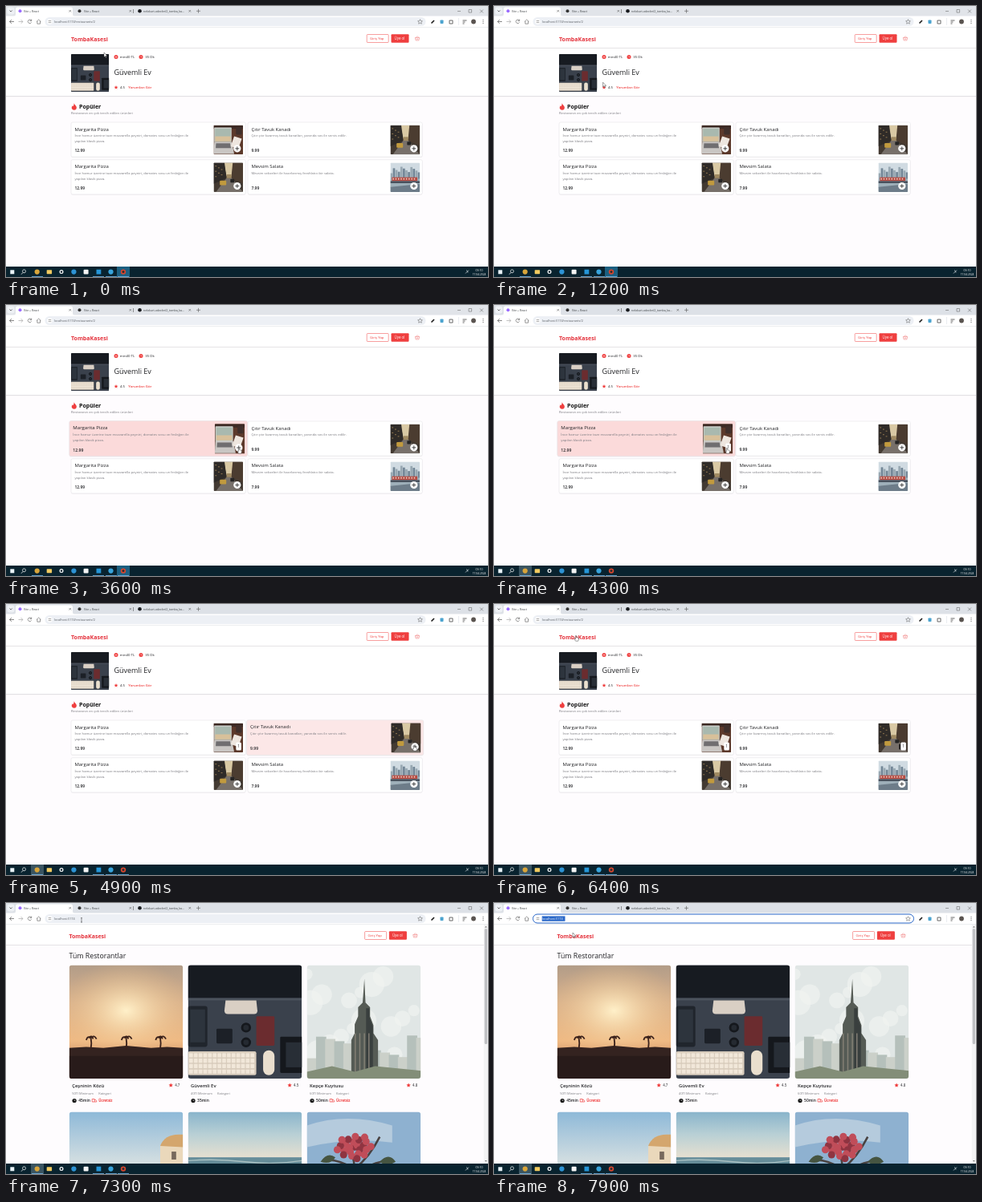
An HTML page that plays this animation: 600 by 338 pixels, repeating every 8000 ms.

```html
<!DOCTYPE html>
<html lang="tr">
<head>
<meta charset="utf-8">
<title>Restaurant menu</title>
<style>
html, body { margin: 0; width: 100%; height: 100%; overflow: hidden; background: #fff; }
svg { display: block; width: 100vw; height: 100vh; font-family: "Open Sans", "Noto Sans", sans-serif; }
text { white-space: pre; }
</style>
</head>
<body>
<svg id="stage" viewBox="0 0 600 338" xmlns="http://www.w3.org/2000/svg"></svg>
<script>
const LOOP = 8000;
const RED = '#ef3f3f', INK = '#202124', GRAY = '#7b7b80';
const BRAND = 'TombaKasesi', PLACE = 'Güvemli Ev';

const text = (x, y, size, str, fill = INK, weight = 400, extra = '') =>
  `<text x="${x}" y="${y}" font-size="${size}" fill="${fill}" font-weight="${weight}" ${extra}>${str}</text>`;
const rect = (x, y, w, h, fill, rx = 0, extra = '') =>
  `<rect x="${x}" y="${y}" width="${w}" height="${h}" rx="${rx}" fill="${fill}" ${extra}/>`;
const dot = (x, y, r, fill, extra = '') => `<circle cx="${x}" cy="${y}" r="${r}" fill="${fill}" ${extra}/>`;
const path = (d, fill = 'none', stroke = 'none', width = 0.6, extra = '') =>
  `<path d="${d}" fill="${fill}" stroke="${stroke}" stroke-width="${width}" ${extra}/>`;
const group = (id, body, extra = '') => `<g id="${id}" ${extra}>${body}</g>`;
const repeat = (n, fn) => Array.from({ length: n }, (_, i) => fn(i)).join('');
const photo = (id, x, y, s) => `<use href="#${id}" x="${x}" y="${y}" width="${s}" height="${s}"/>`;
const star = (x, y, r) => {
  const pts = repeat(10, i => {
    const a = i * Math.PI / 5 - Math.PI / 2, k = i % 2 ? r * 0.48 : r;
    return `${(x + k * Math.cos(a)).toFixed(2)},${(y + k * Math.sin(a)).toFixed(2)} `;
  });
  return `<polygon points="${pts}" fill="${RED}"/>`;
};
const gradient = (id, ...colors) => `<linearGradient id="${id}" x2="0" y2="1">` +
  colors.map((c, i) => `<stop offset="${i / (colors.length - 1)}" stop-color="${c}"/>`).join('') + '</linearGradient>';
const symbol = (id, body) =>
  `<symbol id="${id}" viewBox="0 0 100 100"><g clip-path="url(#round)">${body}</g></symbol>`;

// Photos, each on a 100 x 100 square
const palm = x => path(`M${x} 74q1-5 0-10m-4 2q1-4 4-2q3-3 5 1m-7-1q3-3 4 1`, 'none', '#3a211b', 1.3);
const photos =
  symbol('desk', rect(0, 0, 100, 100, '#3a414c') + rect(0, 0, 100, 29, '#171b21') + rect(0, 29, 100, 2, '#4c535d') +
    path('M33 31h27l1 9q0 3-3 3H35q-3 0-3-3z', '#d9cfc4') + rect(0, 36, 17, 36, '#20252c', 2) +
    rect(2, 39, 13, 29, '#2d343d') + rect(25, 56, 14, 13, '#1c2027', 1) +
    dot(51, 55, 3.4, '#252a31', 'stroke="#15181d" stroke-width="2"') + dot(51, 68, 3.4, '#252a31', 'stroke="#15181d" stroke-width="2"') +
    rect(60, 45, 16, 26, '#6b2c2f', 1) + rect(81, 63, 20, 32, '#15181d', 1) + rect(86, 68, 15, 22, '#282e36') +
    rect(0, 76, 60, 21, '#d9cdbd', 1.5) +
    repeat(4, r => repeat(14, c => rect(1 + c * 4.15, 77.5 + r * 4.8, 3.3, 3.7, '#f1e7d9', 0.5))) +
    rect(66, 75, 10, 22, '#eadfce', 5)) +
  symbol('laptop', rect(0, 0, 100, 100, '#5c392b') + rect(0, 0, 100, 12, '#3d2a24') + rect(2, 8, 59, 50, '#c8cdc8', 2) +
    rect(5, 12, 53, 43, '#a9b9af') + rect(5, 38, 53, 17, '#d8c09a') + path('M2 58h60l8 40H0z', '#c9c6c3') +
    path('M8 62h48l3 16H7z', '#706e70') + path('M70 38l26 8-12 34-26-8z', '#eee6df') + rect(76, 8, 20, 24, '#40302c', 3)) +
  symbol('street', rect(0, 0, 100, 100, '#433a32') + path('M34 0h34l-6 46H44z', '#d9c9a4') + path('M0 0h37l7 53L0 72z', '#2f2b28') +
    path('M65 0h35v70L60 52z', '#4b3c30') + path('M44 52h17l39 48H8z', '#77706a') + rect(44, 40, 17, 13, '#a08a62') +
    rect(21, 61, 22, 16, '#c19a3e', 3) + rect(57, 56, 13, 12, '#252424', 2) + rect(70, 71, 23, 19, '#23201f', 3) +
    repeat(7, i => rect(5 + i % 3 * 10, 10 + i * 6, 5, 3, '#8d744e'))) +
  symbol('skyline', rect(0, 0, 100, 100, '#d0dbe2') +
    repeat(12, i => rect(i * 8.5, 36 - (i * 17 % 23), 7.5, 50, i % 2 ? '#738797' : '#98a8b2')) +
    rect(0, 55, 100, 45, '#9eafb9') + rect(5, 50, 87, 13, '#b74b42') + repeat(9, i => rect(8 + i * 9, 53, 4, 5, '#e8d3c8')) +
    rect(0, 63, 100, 7, '#47505c') + path('M0 83l100-10v27H0z', '#6d7c89')) +
  symbol('sunset', rect(0, 0, 100, 100, 'url(#dusk)') + rect(0, 0, 100, 73, 'url(#sun)') +
    path('M0 73l15-1 15 1 20-2 22 2 14-1 14 1v27H0z', '#342320') + rect(0, 80, 100, 20, '#281b1a') + palm(19) + palm(50) + palm(80)) +
  symbol('tower', rect(0, 0, 100, 100, '#e0e6e5') +
    repeat(16, i => dot(i * 37 % 101, 8 + i * 23 % 76, 5 + i % 4 * 2, '#f2f4f1', 'opacity=".65"')) +
    repeat(13, i => rect(i * 8, 82 - i * 19 % 21, 9, 40, i % 2 ? '#b5c0bb' : '#cbd0c9')) +
    path('M50.5 12l1 21 4 4v8l3 8v7l4 6v34H39V66l3-6v-8l3-7v-8l4-4z', '#555b55') +
    path('M52 38h3v8l3 8v46h-6z', '#393f3e') + repeat(4, i => rect(42 + i * 4, 60, 1, 39, '#858176')) +
    path('M0 94l22-5 20 5 18-5 40 4v7H0z', '#838e78')) +
  symbol('house', rect(0, 0, 100, 100, 'url(#morning)') + path('M80 100V31q0-2 3-2h17v71z', '#ead8bb') +
    path('M80 30q4-10 16-10h4v11z', '#d4a66d') + rect(90, 35, 4, 7, '#77685c')) +
  symbol('sea', rect(0, 0, 100, 40, 'url(#haze)') + rect(0, 40, 100, 60, '#668d99') + path('M0 43q25-2 50 1t50-1', 'none', '#a9c0c2', 1)) +
  symbol('flowers', rect(0, 0, 100, 100, '#8eb1d0') + path('M0 12q35-12 75 0v15q-35-5-75 4z', '#b5cbdd') +
    path('M42 50q-1-15-9-24M42 50q13-10 22-28M42 50q-18-10-27-7M50 50q14-8 24-6', 'none', '#494241', 1.8) +
    repeat(24, i => dot(42 + 16 * Math.sin(i * 2.4) * Math.sqrt(i / 24), 31 + 11 * Math.cos(i * 2.4) * Math.sqrt(i / 24), 3.2, i % 3 ? '#c04d59' : '#8f3441')) +
    path('M12 44q6-9 13-4q-4 7-13 4M64 44q8-9 14 0q-8 5-14 0', '#465541'));

const defs = `<defs><clipPath id="round"><rect width="100" height="100" rx="2.5"/></clipPath>
  ${gradient('dusk', '#b29c88', '#d8b28d', '#efba84', '#b06d50')}
  ${gradient('morning', '#8eb9d8', '#dce3e2', '#ece2d5')}
  ${gradient('haze', '#89b4cb', '#b9d0d5', '#e5dfd0')}
  <radialGradient id="sun" cx=".5" cy=".55" r=".6"><stop stop-color="#fff0c9"/><stop offset="1" stop-color="#efbd83" stop-opacity="0"/></radialGradient>
  ${photos}</defs>`;

// Browser window
const tab = (x, icon, title) => icon + text(x + 7, 7.8, 3.5, title, '#3c4043') +
  path(`M${x + 63.5} 5l2.6 2.6m0-2.6l-2.6 2.6`, 'none', '#444', 0.5);
const browser =
  `<rect id="strip" width="600" height="14"/>` + rect(1.5, 1.5, 9, 9, '#eef1f5', 3) + path('M4.5 5.5l1.6 1.6 1.6-1.6', 'none', '#333', 0.7) +
  path('M9 13q3 0 3-3V4q0-2.5 2.5-2.5h66Q83 1.500 83 4v6q0 3 3 3z', '#fff') + rect(0, 12.5, 600, 14, '#fff') +
  tab(15, dot(17.5, 6.3, 2, '#9b6cff'), 'Vite + React') +
  tab(90, dot(91.500, 6.3, 2, '#333'), 'Vite + React') +
  tab(164, dot(166.5, 6.3, 2.3, '#191b1f'), 'nelokurt-odevler/2_tomba_ka…') +
  path('M158.500 4v5M237 6.300h5m-2.500-2.500v5', 'none', '#555', 0.6) +
  path('M562 6.500h4m10-2h3.600v3.600h-3.600zM590 4.500l4 4m0-4l-4 4', 'none', '#555', 0.5) +
  path('M10 19.500H4.500m2.400-2.400l-2.400 2.400 2.400 2.400', 'none', '#555', 0.7) +
  path('M15.500 19.500H21m-2.400-2.400l2.400 2.400-2.400 2.400', 'none', '#aaa', 0.7) +
  path('M31.500 18a2.300 2.300 0 1 0 .2 2.400M31.700 16.500V18.600h-2.100', 'none', '#555', 0.6) +
  path('M38 19.500l2.700-2.500 2.700 2.500m-4.500-.5v3.200h3.600V19', 'none', '#555', 0.6) +
  rect(48.5, 14, 474, 11, '#edf0f5', 5.5, 'id="omnibox"') + dot(54.500, 19.500, 3.3, '#fff') +
  path('M52.700 18.500h3.600M52.700 20.600h3.600', 'none', '#555', 0.5) +
  rect(59.700, 16.400, 28.800, 6.300, '#2967c8', 0, 'id="selection"') +
  text(60, 21, 3.8, '', '#55595f', 400, 'id="url"') +
  path('M515.500 16.700l.9 1.900 2 .2-1.500 1.400.4 2-1.800-1-1.800 1 .4-2-1.500-1.400 2-.2z', 'none', '#555', 0.5) +
  path('M529.500 21.500l3.500-3.500', 'none', '#222', 1.700) + rect(540.500, 17.500, 4, 4.500, '#4ba3cf', 0.700) +
  path('M552 18h4v4h-4zM568.500 18h5m-5 2h3m-3 2h2', 'none', '#444', 0.8) + rect(563, 15, 0.5, 9, '#d5dae1') +
  dot(582, 19.500, 2.900, '#5a5450') + repeat(3, i => dot(594, 17.500 + i * 2, 0.55, '#444')) +
  rect(0, 26.3, 600, 0.6, '#dfe2e6');

const navbar = rect(-5, 27, 610, 25, '#fff') + rect(-5, 52, 610, 1, '#e5e3e6') + text(81, 43.5, 7.05, BRAND, '#e4323c', 700) +
  rect(449.2, 35.5, 27, 10, '#fff', 1, `stroke="${RED}" stroke-width=".5"`) + text(453, 42.1, 4.3, 'Giriş Yap', RED) +
  rect(479.500, 35.3, 22, 10.4, RED, 1) + text(483.5, 42.1, 4.4, 'Üye ol', '#fff', 500) +
  path('M509.300 39.500h5.400l-.8 3.400h-3.800zM510.500 39.400l1-1.700m1 0l1 1.700M511.300 40.500v1.500m1.400-1.500v1.500', 'none', '#f08080', 0.6);

// Restaurant page
const items = [
  [81, 145, 'Margarita Pizza', ['İnce hamur üzerine taze mozzarella peyniri, domates sosu ve fesleğen ile', 'yapılan klasik pizza.'], '12.99', 'laptop'],
  [301, 145, 'Çıtır Tavuk Kanadı', ['Çıtır çıtır kızarmış tavuk kanatları, yanında sos ile servis edilir.'], '9.99', 'street'],
  [81, 191.7, 'Margarita Pizza', ['İnce hamur üzerine taze mozzarella peyniri, domates sosu ve fesleğen ile', 'yapılan klasik pizza.'], '12.99', 'street'],
  [301, 191.7, 'Mevsim Salata', ['Mevsim sebzeleri ile hazırlanmış ferahlatıcı bir salata.'], '7.99', 'skyline']
];
const item = ([x, y, name, lines, price, image], i) => group('card' + i,
  rect(0, 0.7, 217.3, 43.4, '#000', 2, 'opacity=".06"') +
  rect(0, 0, 217.3, 43.2, '#fff', 2, `id="face${i}" stroke="#e6e4e7" stroke-width=".6"`) +
  text(4.4, 10.6, 5.95, name) + lines.map((line, n) => text(4.400, 18 + n * 7.4, 4.2, line, GRAY)).join('') +
  text(4.400, 37.3, 5, price, INK, 600) + photo(image, 177.5, 3.700, 36.5) +
  group('plus' + i, dot(206.8, 32.8, 4.6, '#fff') + path('M204.300 32.800h5m-2.500-2.500v5', 'none', '#222', 0.8)) +
  group('count' + i, rect(205.3, 27.4, 6.6, 10, '#fff', 1.5) + text(207.3, 34.2, 4.6, '1', INK, 500)));

const menuPage = group('menu', rect(0, 27, 600, 299, '#fefcfe') + navbar + rect(0, 53, 600, 59, '#fff') + rect(0, 112, 600, 1.200, '#e3e1e5') +
  photo('desk', 81, 60, 47.2) + dot(137, 63.600, 2.500, RED) + text(141.8, 65.2, 4.3, 'min40 TL') +
  path('M137 62.500v2.200m-1.100-1.100h2.200M168 62.300v1.400h1.200', 'none', '#fff', 0.5) +
  dot(168, 63.600, 2.500, RED) + path('M168 62.300v1.400h1.200', 'none', '#fff', 0.5) + text(173.3, 65.2, 4.3, '35 Dk') +
  text(134.4, 85.9, 9, PLACE, INK, 500) + star(137, 101.6, 2.5) + text(142, 103.3, 4.3, '4.5') + text(152.3, 103.3, 4.3, 'Yorumları Gör', RED, 600) +
  path('M84.700 121.200q.7 2 2.300 3.400 1.500 1.900.6 3.600-1 1.600-2.800 1.600-2.300 0-3-2-.5-2 1-3.600l.8 1q1.200-1.800 1.100-4z', RED) +
  text(91, 127.8, 7, 'Popüler', '#111', 700) + text(81, 135.3, 4.2, 'Restoranın en çok tercih edilen ürünleri', GRAY) +
  [3, 2, 1, 0].map(i => item(items[i], i)).join(''));

// Restaurant list page
const place = (x, image, name, rating, minimum, time, free) => photo(image, x, 77.5, 141.600) +
  text(x + 3.5, 229.5, 5.9, name, INK, 600) + star(x + 126.5, 227.3, 2.8) + text(x + 131.500, 229.2, 4.4, rating, INK, 500) +
  text(x + 3.5, 238.9, 4, minimum + 'Tl Minimum', GRAY) + text(x + 36.5, 238.9, 4, 'Kategori', GRAY) +
  dot(x + 6.4, 246.5, 2.600, '#111') + path(`M${x + 6.4} 244.800v1.800h1.300`, 'none', '#fff', 0.5) +
  text(x + 11.5, 248.3, 4.9, time + 'min', INK, 600) +
  (free ? path(`M${x + 28.5} 244.500h3v3.500h-3zM${x + 31.500} 245.500h1.500l1 1.300v1.200h-2.500`, 'none', RED, 0.7) +
    text(x + 36.5, 248.1, 4.300, 'Ücretsiz', RED, 700) : '');
const listPage = group('list', rect(0, 27, 600, 299, '#fefcfe') + `<g transform="translate(-2.600)">${navbar}</g>` +
  text(78.5, 69, 8.8, 'Tüm Restorantlar') +
  place(78.7, 'sunset', 'Çeşninin Közü', '4.7', 50, 45, true) +
  place(226.6, 'desk', PLACE, '4.5', 40, 35, false) +
  place(374.600, 'tower', 'Kepçe Kuytusu', '4.8', 60, 50, true) +
  photo('house', 78.7, 260.5, 141.600) + photo('sea', 226.6, 260.5, 141.600) + photo('flowers', 374.600, 260.5, 141.600) +
  rect(594.700, 27, 5.300, 299, '#f3f3f4') + rect(595.700, 32, 3.400, 144, '#bfc0c3', 1.6) +
  path('M596 30.500l1.400-1.700 1.400 1.700zM596 321l1.400 1.700 1.400-1.700z', '#777'));

const taskbar = rect(0, 325, 600, 13, '#09232f') + `<rect id="focus" y="325" width="16" height="13"/>` +
  rect(5.3, 329.3, 5, 5, '#e9f3f8') + dot(22.500, 330.8, 2, 'none', 'stroke="#fff" stroke-width=".7"') + path('M21 332.500l-2 2.200', 'none', '#fff', 0.8) +
  dot(38.7, 331.6, 3.1, '#d9a53a') + rect(50.700, 329.2, 6.4, 5, '#f2cb60', 0.6) + dot(69, 331.6, 1.900, 'none', 'stroke="#fff" stroke-width="1.200"') +
  dot(84.4, 331.6, 3.1, '#2d93d5') + rect(96.600, 328.7, 6, 5.800, '#f4f4f4', 1) + rect(112.500, 328.700, 5.800, 5.800, '#2596d8') +
  dot(130.500, 331.6, 3.1, '#38a4dc') + dot(146, 331.6, 3.2, '#d6472f') + dot(146, 331.6, 1.500, '#2b2d31') +
  [32, 108, 124, 139].map(x => rect(x, 337.2, 14, 0.8, '#76b9ed')).join('') +
  path('M572 333.500l4-4m-3 0q2 1 2 3', 'none', '#dbe5e9', 0.7) +
  text(593.5, 330.7, 3.5, '09:10', '#fff', 400, 'text-anchor="end"') + text(597.5, 336, 3.3, '17.04.2024', '#fff', 400, 'text-anchor="end"');

const cursor = group('cursor',
  path('M0 0v5.700l1.350-1.250.9 2.050.85-.35-.9-2h1.850z', '#fff', '#111', 0.4, 'id="arrow"') +
  path('M-.6.600q.6-1 1.200 0v2.100l2 .4q.8.2.8 1v1.500L2.700 7.200H-.4L-2 4.800q0-.9.700-.6l.7.600z', '#fff', '#111', 0.4, 'id="hand"') +
  path('M-1-2.500q1 0 1 .6 0-.6 1-.6M0-1.900v4.600M-1 3.200q1 0 1-.6 0 .6 1 .6', 'none', '#222', 0.5, 'id="beam"'));

const stage = document.getElementById('stage');
stage.innerHTML = defs + menuPage + listPage + browser + taskbar + cursor;
const el = id => document.getElementById(id);
const show = (id, on) => el(id).setAttribute('display', on ? 'inline' : 'none');
const set = (id, name, value) => el(id).setAttribute(name, value);

const clamp = v => Math.min(1, Math.max(0, v));
const ease = v => { const k = clamp(v); return k * k * (3 - 2 * k); };
const mix = (a, b, k) => a + (b - a) * k;

// Time, x, y
const route = [
  [0, 122, 58], [300, 122, 58], [1000, 132, 84], [1700, 150, 140], [1980, 158, 172], [2800, 158, 172], [3500, 290, 178],
  [4450, 290, 178], [4850, 508, 176], [5550, 508, 176], [6300, 102, 39], [6700, 102, 39],
  [7200, 94, 21], [7600, 94, 21], [7880, 98, 37]
];
const CLICKS = [3950, 5200], OPEN_LIST = 6650, SELECT_URL = 7500;
const HOVERS = [[1800, 4540], [4720, 5620]];

function cursorAt(t) {
  const next = route.findIndex(stop => stop[0] > t);
  if (next < 0) return route.at(-1).slice(1);
  const [t0, x0, y0] = route[next - 1], [t1, x1, y1] = route[next];
  const k = ease((t - t0) / (t1 - t0));
  return [mix(x0, x1, k), mix(y0, y1, k)];
}

function draw(t) {
  const listed = t >= OPEN_LIST, selected = t >= SELECT_URL, active = t >= CLICKS[0];
  show('menu', !listed);
  show('list', listed);

  items.forEach(([x, y], i) => {
    const [on, off] = HOVERS[i] || [LOOP, LOOP];
    const k = ease((t - on) / 300) * (1 - ease((t - off) / 300));
    const s = 1 + 0.02 * k;
    set('card' + i, 'transform', `translate(${x + 108.65 * (1 - s)} ${y + 21.6 * (1 - s)}) scale(${s})`);
    set('face' + i, 'fill', `rgb(${mix(255, 251, k)},${mix(255, 218, k)},${mix(255, 218, k)})`);
    const added = t >= (CLICKS[i] ?? LOOP);
    show('plus' + i, !added);
    show('count' + i, added);
  });

  set('strip', 'fill', active ? '#dde1e7' : '#e1e4e9');
  set('focus', 'x', active ? 31 : 138);
  set('focus', 'fill', active ? '#3b5561' : '#1c5f80');
  el('url').textContent = 'localhost:5174' + (listed ? '' : '/restaurants/2');
  set('url', 'fill', selected ? '#fff' : '#55595f');
  show('selection', selected);
  set('omnibox', 'fill', selected ? '#fff' : '#edf0f5');
  set('omnibox', 'stroke', selected ? '#2967c8' : 'none');

  const [x, y] = cursorAt(t);
  const beam = y < 26;
  const hand = !beam && ((t > 1780 && t < 5600) || (t > 6250 && t < 7000));
  set('cursor', 'transform', `translate(${x} ${y})`);
  show('beam', beam);
  show('hand', hand);
  show('arrow', !beam && !hand);
}

const start = performance.now();
function tick() {
  draw((performance.now() - start) % LOOP);
  requestAnimationFrame(tick);
}
tick();
</script>
</body>
</html>
```
